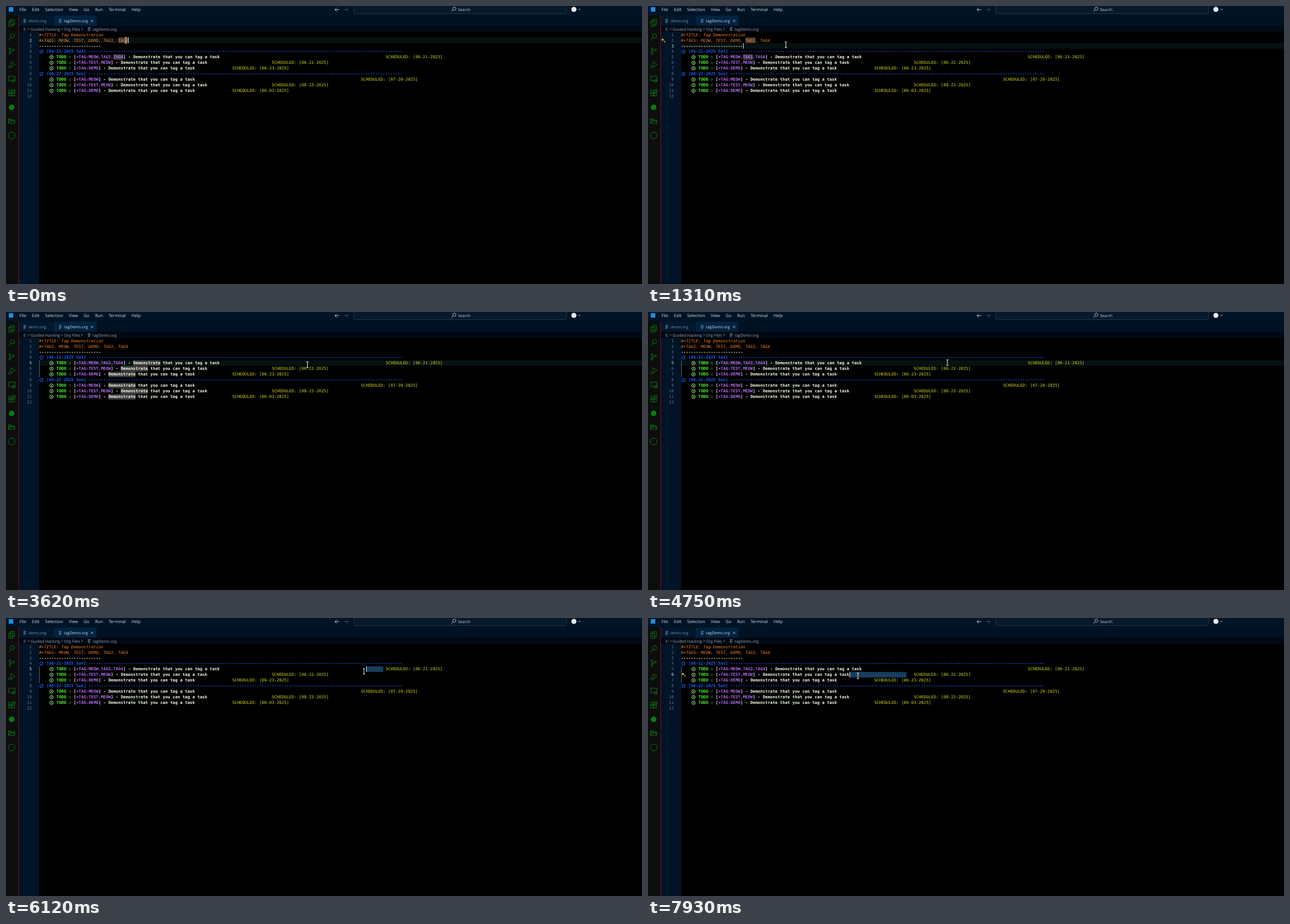
Recreate the animation shown at these times as an HTML page with a canvas. Size 1130 by 495 pixels, loop 8 s.

```html
<!DOCTYPE html>
<html lang="en">
<head>
<meta charset="utf-8">
<title>Tag demonstration</title>
<style>
html, body { margin: 0; width: 100%; height: 100%; overflow: hidden; background: #000; }
canvas { display: block; width: 1130px; height: 495px; }
</style>
</head>
<body>
<canvas id="stage" width="1130" height="495"></canvas>
<script>
const ctx = document.getElementById('stage').getContext('2d');
const LOOP = 8000, CW = 4.4, LEFT = 58.7;
const MONO = '7.31px "DejaVu Sans Mono", monospace';
const SANS = '"Open Sans", "Noto Sans", sans-serif';
const GREEN = '#0a7a10', GREY = '#b8c0c8', DIM = '#97a4b0';

const day = date => `   [${date}] ` + '-'.repeat(127);
const task = (tags, date, col) =>
  `       TODO : [+TAG:${tags}] - Demonstrate that you can tag a task`.padEnd(col) + `SCHEDULED: [${date}-2025]`;

const lines = [
  '#+TITLE: Tag Demonstration',
  '#+TAGS: MEOW, TEST, DEMO, TAG3, TAG4',
  '-'.repeat(25),
  day('06-21-2025 Sat'),
  task('MEOW,TAG3,TAG4', '06-21', 140),
  task('TEST,MEOW', '06-22', 94),
  task('DEMO', '06-23', 78),
  day('06-22-2025 Sun'),
  task('MEOW', '07-20', 130),
  task('TEST,MEOW', '08-23', 94),
  task('DEMO', '06-03', 78),
  ''
];

const syntax = [
  [/^#.*/, '#ea7f2e', 'italic'],
  [/^-+$/, '#f0ecc0', 'bold'],
  [/\[[\d-]+ S\w+\] -+/, '#1a60ff', 'bold'],
  [/TODO :/, '#4dfa2e', 'bold'],
  [/\[(?=\+)/, '#e8d8ff', 'bold'],
  [/\+TAG:[\w,]+/, '#b76cf5', 'bold'],
  [/\](?= - )/, '#e8d8ff', 'bold'],
  [/- Demo.*task/, '#effbe4', 'bold'],
  [/SCHEDULED.*/, '#cdd91c', '']
];

// Clicks, double-clicked words, and drags that end at `until`
const steps = [
  { at: 0, row: 2, col: 36, word: 'TAG4' },
  { at: 650, row: 2, col: 30, word: 'TAG3', hint: 27 },
  { at: 1290, row: 3, col: 25 },
  { at: 1810, row: 5, col: 49, word: 'Demonstrate' },
  { at: 3900, row: 5, col: 77 },
  { at: 6060, row: 5, anchor: 139, until: 6600, hint: 63 },
  { at: 7420, row: 6, col: 91 },
  { at: 7540, row: 6, anchor: 91, until: 7690, hint: 63 }
];

// Pointer stops: time, x, y
const stops = [
  [0, 213, 61], [600, 183, 61], [1310, 245, 69], [1800, 243, 91], [2430, 342, 206],
  [3310, 640, 96], [4000, 395, 91], [4400, 395, 91], [4750, 532, 90], [5500, 671, 93],
  [6060, 671, 94], [6120, 636, 95], [6600, 470, 98], [7120, 461, 101], [7530, 459, 101],
  [7690, 356, 102], [7930, 373, 103]
];

const rowY = n => 51 + (n - 1) * 9.95;
const colX = c => LEFT + c * CW;
const stepAt = t => steps.filter(s => s.at <= Math.max(0, t)).pop();

function pointer(t) {
  const i = stops.findIndex(s => s[0] > t);
  if (i < 0) return stops[stops.length - 1].slice(1);
  const [t0, x0, y0] = stops[i - 1], [t1, x1, y1] = stops[i];
  const u = (t - t0) / (t1 - t0), k = u * u * (3 - 2 * u);
  return [x0 + (x1 - x0) * k, y0 + (y1 - y0) * k];
}

function rect(x, y, w, h, color) {
  ctx.fillStyle = color;
  ctx.fillRect(x, y, w, h);
}

const band = (x, row, w, color) => rect(x, Math.round(rowY(row) - 5), w, 10, color);

function text(s, x, y, color, font) {
  ctx.font = font;
  ctx.fillStyle = color;
  ctx.fillText(s, x, y);
}

// Draws interface text and returns its right edge
function ui(s, x, y, color, size = 7) {
  text(s, x, y + size * 0.36, color, `${size}px ${SANS}`);
  return x + ctx.measureText(s).width;
}

const code = (s, x, row, color, style) =>
  text(s, x, Math.round(rowY(row) + 2.6), color, `${style} ${MONO}`);

function stroke(d, color, width = 1) {
  ctx.strokeStyle = color;
  ctx.lineWidth = width;
  ctx.stroke(new Path2D(d));
}

function circle(x, y, r, color, filled) {
  ctx.beginPath();
  ctx.arc(x, y, r, 0, 7);
  ctx.fillStyle = ctx.strokeStyle = color;
  ctx.lineWidth = 1;
  if (filled) ctx.fill(); else ctx.stroke();
}

function frameBox(x, y, w, h, color) {
  ctx.strokeStyle = color;
  ctx.lineWidth = 1;
  ctx.strokeRect(x, y, w, h);
}

function fileIcon(x, y) {
  for (let i = 0; i < 4; i++) rect(x, y - 3 + i * 1.8, i % 2 ? 3.5 : 5, .8, DIM);
}

const chevron = (x, y) => stroke(`M${x} ${y - 2}l2 2l-2 2`, DIM, .8);

function star(x, y, r) {
  ctx.fillStyle = '#ffd21f';
  ctx.beginPath();
  for (let i = 0; i < 8; i++) {
    const a = i * Math.PI / 4, d = i % 2 ? r * .35 : r;
    ctx.lineTo(x + d * Math.cos(a), y + d * Math.sin(a));
  }
  ctx.fill();
}

function titleBar() {
  rect(0, 0, 1130, 17, '#001425');
  rect(5, 2, 8, 8, '#1b8fdc');
  let x = 24;
  for (const s of 'File Edit Selection View Go Run Terminal Help'.split(' '))
    x = ui(s, x, 6.3, '#d8dce0', 7.6) + 10;
  stroke('M592 6.5h-7.5m3.2-3.2l-3.2 3.2l3.2 3.2', GREY);
  stroke('M600.5 6.5h7.5m-3.2-3.2l3.2 3.2l-3.2 3.2', '#43505c');
  ctx.beginPath();
  ctx.roundRect(618, -4, 378, 17.5, 3);
  ctx.fillStyle = '#071a2b';
  ctx.fill();
  ctx.strokeStyle = '#263746';
  ctx.lineWidth = 1;
  ctx.stroke();
  circle(796.5, 4.8, 2.8, GREY);
  stroke('M794.5 7l-3.3 3.3', GREY);
  ui('Search', 803, 6.3, '#ccd2d8');
  circle(1009, 6, 4.5, '#e4e8ec', true);
  stroke('M1017 5l2 2l2-2', GREY, .9);
}

function tabs() {
  rect(23, 17, 1107, 18, '#001122');
  rect(23, 17, 61, 18, '#00182d');
  rect(85, 17, 76, 18, '#002340');
  fileIcon(31, 26.5);
  ui('demo.org', 40, 26.5, '#7f8f9e');
  fileIcon(94, 26.5);
  ui('tagDemo.org', 103, 26.5, '#d4dae0');
  stroke('M151 24.5l4 4m0-4l-4 4', GREY, .9);
  rect(23, 35, 1107, 11, '#000a14');
  let x = 31;
  for (const s of ['E:', 'Guided Hacking', 'Org Files']) {
    x = ui(s, x, 41, DIM, 7.1) + 2.5;
    chevron(x, 41);
    x += 4.5;
  }
  fileIcon(145.5, 41);
  ui('tagDemo.org', 154, 41, DIM);
}

const icons = [
  () => { frameBox(-2, -6, 7, 9, GREEN); frameBox(-5, -3, 7, 9, GREEN); },
  () => { circle(1.5, -2, 3.7, GREEN); stroke('M-1 1l-4 5', GREEN); },
  () => {
    circle(-3, -4, 1.6, GREEN);
    circle(-3, 4, 1.6, GREEN);
    circle(3.5, -2, 1.6, GREEN);
    stroke('M-3-2v4q0-2 3-2q3 0 3-1', GREEN);
  },
  () => { stroke('M-1-1v-5l7 5l-6 4', GREEN); circle(-2.7, 3, 2.4, GREEN); },
  () => { frameBox(-5, -5, 11, 8, GREEN); circle(3.5, 3.5, 2.4, GREEN); },
  () => {
    for (let i = 0; i < 3; i++) frameBox(i > 1 ? 0 : -5, i ? 0 : -5, 5, 5, GREEN);
    frameBox(2, -6, 4, 4, GREEN);
  },
  () => circle(0, .5, 5, GREEN, true),
  () => { frameBox(-5.5, -2, 11, 6, GREEN); stroke('M-5.5-2v-2h4l2 2M-5 3l2-3h8', GREEN); },
  () => circle(0, .5, 6, GREEN)
];

function activityBar() {
  rect(0, 17, 22, 478, '#0d0d0e');
  rect(22, 17, 1, 478, '#8c0a14');
  icons.forEach((icon, i) => {
    ctx.save();
    ctx.translate(10, 30 + i * 25);
    icon();
    ctx.restore();
  });
}

function gutter(row) {
  rect(23, 46, 36, 449, '#001428');
  ctx.textAlign = 'right';
  lines.forEach((_, i) => code(i + 1, 46, i + 1, i + 1 === row ? '#e0e4e8' : '#5c7484', ''));
  ctx.textAlign = 'left';
}

function markWord(word) {
  lines.forEach((line, i) => {
    const c = line.indexOf(word);
    if (c >= 0) band(colX(c), i + 1, word.length * CW, i < 4 ? '#4c3a32' : '#3a383c');
  });
}

function select(row, from, to) {
  band(colX(from), row, (to - from) * CW, '#173b5c');
  for (let c = from; c < to; c++) rect(colX(c) + 1.7, rowY(row) - .2, 1, 1, '#44708f');
}

function bullet(line, y) {
  if (line.includes('TODO')) {
    circle(80.8, y, 3.1, '#a8f58c');
    circle(80.8, y, 1, '#a8f58c', true);
  } else if (line.startsWith('   [')) {
    circle(63, y, 3.1, '#1a60ff');
    stroke(`M61 ${y + 2}l4-4`, '#1a60ff');
  }
}

function documentText() {
  lines.forEach((line, i) => {
    bullet(line, rowY(i + 1) + .3);
    for (const [rule, color, style] of syntax) {
      const m = line.match(rule);
      if (m) code(m[0], colX(m.index), i + 1, color, style);
    }
  });
}

function draw(t) {
  const [mx, my] = pointer(t);
  const now = stepAt(t), shown = stepAt(t - 120);
  const settled = Math.min(t, now.until || now.at);
  let col = now.col;

  rect(0, 0, 1130, 495, '#000');
  titleBar();
  tabs();
  activityBar();
  gutter(now.row);
  if (!now.anchor) band(60, now.row, 1070, '#071111');
  if (now.row > 4) rect(59, 86, 1, 30, '#5a625c');
  if (shown.word) markWord(shown.word);
  if (now.anchor) {
    const edge = Math.ceil((pointer(settled)[0] - LEFT) / CW);
    col = Math.min(edge, now.anchor);
    select(now.row, col, now.anchor);
  }
  documentText();

  if ((t - settled) % 1000 < 500) band(Math.round(colX(col)), now.row, 1, '#d8d8d8');
  if (shown.hint && t > (shown.until || shown.at) + 200) {
    star(shown.hint - 1, rowY(shown.row) - 1, 3.2);
    star(shown.hint + 2.4, rowY(shown.row) + 2.2, 2);
  }
  stroke(`M${mx - 2} ${my - 5}h4m-2 0v10m-2 0h4`, '#e4e4dc', 1.1);
}

function frame(now) {
  draw(now % LOOP);
  requestAnimationFrame(frame);
}

ctx.textRendering = 'geometricPrecision';
requestAnimationFrame(frame);
</script>
</body>
</html>
```
